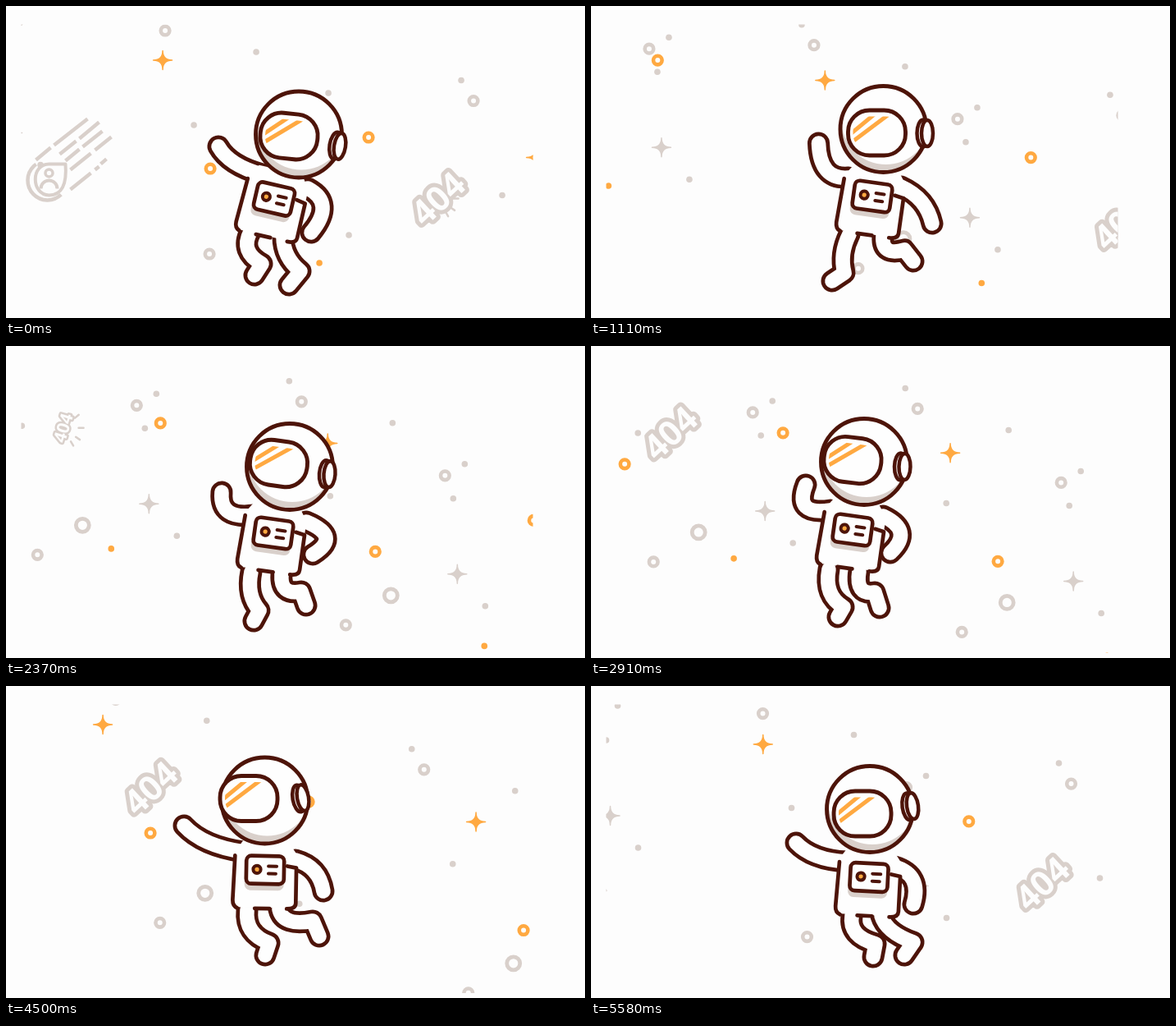
Animation, 706 px wide and 380 px high, one loop 5610 ms. Source, as an HTML page with a canvas:

```html
<!DOCTYPE html>
<html lang="en">
<head>
<meta charset="utf-8">
<title>Astronaut adrift</title>
<style>
html, body { margin: 0; width: 100%; height: 100%; overflow: hidden; background: #fdfdfd; }
canvas { display: block; }
</style>
</head>
<body>
<canvas id="stage" width="706" height="380"></canvas>
<script>
const c = document.getElementById('stage').getContext('2d');
const LOOP = 5610, DRIFT = 5360, TAU = Math.PI * 2, RAD = Math.PI / 180;
const BROWN = '#4d1409', ORANGE = '#ffa941', GREY = '#d9d0cb', WHITE = '#fefefe', BG = '#fdfdfd';

// Two parallax layers: each repeats along its own drift vector.
const layers = [
  { dx: 376, dy: 85.5, color: GREY, items: [
    ['ring', 194, 30], ['ring', 369, 120], ['ring', 248, 302], ['big', 303, 266], ['star', 384, 240],
    ['dot', 179, 5], ['dot', 305, 56], ['dot', 393, 106], ['dot', 379, 148], ['dot', 229, 145], ['dot', 418, 279]] },
  { dx: 455, dy: 118.5, color: ORANGE, items: [
    ['star', 191, 66], ['ring', 442, 160], ['ring', 249, 198], ['dot', 382, 313]] }
];

// Poses of the astronaut, one row per key time.
const times = [0, 1110, 2370, 2910, 3600, 4500, 5580];
const poses = {
  torso: [[327, 235, 13], [343, 232, 8], [326, 228, 8], [319, 224, 8], [315, 222, 2], [316, 224, 1], [339, 233, 3]],
  head: [[357, 156.5], [356.5, 150], [346, 147], [333, 141], [320.5, 138], [315.5, 139.5], [340, 150]],
  visor: [[345, 158.5, 6], [348.5, 154.5, 0], [332.5, 143, 8], [319, 139, 7], [305.5, 137, 1], [296, 137, 0], [331, 155.5, 0]],
  ear: [[405, 170.5, 9], [408, 155, 0], [392.5, 156, 4], [380.5, 147, 1], [367.5, 140, -5], [360, 136.5, -10], [390, 146.5, -8]],
  armL: [
    [312, 205, 272, 194, 259, 171], [314, 209, 279, 212, 277.5, 167], [303, 206, 260, 212, 263, 178],
    [292, 200, 247, 207, 262, 169], [288, 197, 240, 180, 208, 155], [290, 202, 240, 195, 217, 170], [312, 214, 270, 212, 250, 191]],
  armR: [
    [368, 222, 402, 240, 372, 276], [378, 220, 409, 234, 416, 265], [366, 214, 410, 232, 374, 254],
    [356, 207, 394, 225, 365, 252], [350, 208, 384, 218, 394, 252], [353, 212, 382, 220, 387, 250], [370, 220, 404, 230, 393, 266]],
  legL: [
    [298, 275, 285, 299, 312, 314, 303, 328], [315, 278, 303, 302, 309, 325, 294, 335], [299, 275, 293, 304, 309, 322, 302, 335],
    [290, 272, 284, 304, 308, 318, 301, 330], [292, 272, 290, 303, 319, 315, 313, 331], [294, 273, 291, 302, 321, 313, 316, 328],
    [318, 280, 314, 305, 347, 314, 344, 330]],
  legR: [
    [338, 281, 338, 306, 359, 323, 345, 340], [356, 280, 354, 305, 382, 297, 393, 311], [336, 278, 334, 304, 360, 299, 366, 316],
    [327, 274, 322, 304, 346, 300, 352, 319], [331, 270, 338, 293, 373, 287, 381, 306], [333, 272, 338, 293, 374, 286, 382, 305],
    [354, 280, 360, 300, 393, 312, 382, 328]]
};

// Smooth cubic through the key poses.
function pose(rows, t) {
  let i = 0;
  while (i < times.length - 2 && t > times[i + 1]) i++;
  const span = times[i + 1] - times[i], u = (t - times[i]) / span;
  const slope = (j, k) => {
    const a = Math.max(j - 1, 0), b = Math.min(j + 1, times.length - 1);
    return (rows[b][k] - rows[a][k]) / (times[b] - times[a]) * span;
  };
  const e = u * u * (3 - 2 * u), a = u * (1 - u) * (1 - u), b = u * u * (u - 1);
  return rows[i].map((v, k) => v + (rows[i + 1][k] - v) * e + slope(i, k) * a + slope(i + 1, k) * b);
}

function at(x, y, deg, draw) {
  c.save();
  c.translate(x, y);
  c.rotate(deg * RAD);
  draw();
  c.restore();
}

function paint(fill, stroke, width) {
  if (fill) { c.fillStyle = fill; c.fill(); }
  if (stroke) { c.strokeStyle = stroke; c.lineWidth = width; c.stroke(); }
}

function oval(x, y, rx, ry, fill, stroke, width) {
  c.beginPath();
  c.ellipse(x, y, rx, ry, 0, 0, TAU);
  paint(fill, stroke, width);
}

function box(x, y, w, h, r, fill, stroke, width) {
  c.beginPath();
  c.roundRect(x - w / 2, y - h / 2, w, h, r);
  paint(fill, stroke, width);
}

function lines(list, color, width) {
  c.beginPath();
  for (const [x, y, ...rest] of list) {
    c.moveTo(x, y);
    for (let i = 0; i < rest.length; i += 2) c.lineTo(rest[i], rest[i + 1]);
  }
  paint(null, color, width);
}

const shapes = {
  dot: color => oval(0, 0, 3.8, 3.8, color),
  ring: color => oval(0, 0, 5.3, 5.3, BG, color, 4.6),
  big: color => oval(0, 0, 8, 8, BG, color, 4.8),
  star(color) {
    c.beginPath();
    c.moveTo(0, -11.5);
    for (const [x, y] of [[1, 0], [0, 1], [-1, 0], [0, -1]])
      c.quadraticCurveTo((x - y) * -0 + (x + y) * 0 + (x || y) * 0, 0, x * 11.5, y * 11.5);
    paint(color, color, 1.5);
  }
};

function sky(t) {
  for (const { dx, dy, color, items } of layers)
    for (const [kind, x, y] of items)
      for (let k = -2; k < 2; k++) {
        const n = t / DRIFT + k;
        at(x + dx * n, y + dy * n, 0, () => shapes[kind](color));
      }
}

function sign(x, y, age, left) {
  if (age < 0 || left < 0) return;
  const s = Math.min(1, 0.32 + age / 400, left / 150);
  if (age < 400)
    at(x, y, 0, () => lines([-40, 0, 35, 60].map(d => {
      const p = Math.cos(d * RAD), q = Math.sin(d * RAD);
      return [p * 19, q * 19, p * 25, q * 25];
    }), GREY, 2.5));
  at(x, y, -43 - (1 - s) * 60, () => {
    c.scale(s, s);
    c.font = 'bold 42px "Open Sans", sans-serif';
    c.textAlign = 'center';
    c.textBaseline = 'alphabetic';
    c.strokeStyle = GREY;
    c.lineWidth = 10;
    c.strokeText('404', 0, 15);
    c.fillStyle = BG;
    c.fillText('404', 0, 15);
  });
}

function comet(p) {
  at(52 - 0.5 * p, 212 + 0.4 * p, 0, () => {
    c.lineCap = 'butt';
    lines([[-15, -25, 3, -40], [7, -43, 48, -75], [14, -32, 34, -48], [38, -51, 62, -71],
      [21, -24, 38, -38], [42, -41, 66, -60], [27, -13, 52, -33], [57, -37, 77, -53],
      [27, 11, 52, -9], [57, -13, 62, -17], [64, -20, 71, -26]], GREY, 4.5);
    c.beginPath();
    c.arc(-1, 0, 24, 0.8, 4.1);
    paint(null, GREY, 4.5);
    c.beginPath();
    c.moveTo(21, -20);
    c.quadraticCurveTo(24, 18, 1, 18);
    c.bezierCurveTo(-21, 18, -22, -21, 2, -20);
    c.closePath();
    paint(BG, GREY, 4);
    oval(1, -9, 4.5, 4.5, BG, GREY, 3.5);
    c.beginPath();
    c.arc(1, 10, 10, Math.PI, TAU);
    paint(null, GREY, 4);
    c.lineCap = 'round';
  });
}

function limb([x, y, ...p], width) {
  c.beginPath();
  c.moveTo(x, y);
  c.quadraticCurveTo(...p.slice(0, 4));
  if (p.length > 4) c.lineTo(p[4], p[5]);
  paint(null, BROWN, width);
  paint(null, WHITE, width - 9.4);
}

function torso() {
  c.beginPath();
  c.moveTo(-27, -36);
  c.lineTo(27, -36);
  c.lineTo(38, -20);
  c.lineTo(38, 46);
  c.lineTo(-37, 46);
  c.lineTo(-38, -20);
  paint(WHITE);
  c.beginPath();
  c.moveTo(-37, -17);
  c.lineTo(-39, 37);
  c.quadraticCurveTo(-39, 45, -33, 47);
  c.moveTo(-12, 47);
  c.lineTo(6, 47);
  c.moveTo(27, -5);
  c.lineTo(38, -3);
  c.lineTo(38, 40);
  c.quadraticCurveTo(38, 47, 27, 47);
  paint(null, BROWN, 4.7);
  box(-1, 7, 48, 36, 7, GREY);
  box(0, 0, 46, 34, 6, WHITE, BROWN, 4.7);
  oval(-10, -0.5, 4.6, 4.6, ORANGE, BROWN, 4);
  lines([[4, -4.5, 14, -4.5], [4, 4.5, 13, 4.5]], BROWN, 4);
}

function astronaut(t) {
  const now = {};
  for (const part in poses) now[part] = pose(poses[part], t);
  limb(now.armR, 27);
  limb(now.armL, 27);
  limb(now.legL, 27);
  limb(now.legR, 27);
  at(...now.torso, torso);

  at(...now.head, 0, () => {
    c.save();
    oval(0, 0, 52.5, 52.5, GREY);
    c.clip();
    oval(3, -11, 54, 54, WHITE);
    c.restore();
    oval(0, 0, 52.5, 52.5, null, BROWN, 4.9);
  });
  at(...now.visor, () => {
    box(0, 0, 70, 55, 26, WHITE, BROWN, 4.9);
    c.save();
    c.beginPath();
    c.roundRect(-29, -20, 58, 40, 18);
    c.clip();
    c.lineCap = 'butt';
    lines([[-34, 3, 0, -25], [-30, 11, 18, -25]], ORANGE, 5);
    c.restore();
  });
  at(...now.ear, () => {
    oval(-3, 0, 7.5, 16.5, WHITE, BROWN, 4.5);
    oval(2, 0, 7, 16, WHITE, BROWN, 4.5);
  });
}

function draw(t) {
  const p = t > 2700 ? t - DRIFT : t;
  c.fillStyle = BG;
  c.fillRect(0, 0, 706, 380);
  c.lineCap = c.lineJoin = 'round';
  c.save();
  c.beginPath();
  c.rect(18.5, 22.5, 624, 351.5);
  c.clip();
  sky(t);
  sign(96.5 + 0.05 * (t - 2910), 106 + 0.0115 * (t - 2910), t - 2300, 4850 - t);
  sign(526.5 + 0.107 * p, 234.5 + 0.027 * p, p + 330, 2000 - p);
  comet(p);
  c.restore();
  astronaut(t);
}

function frame() {
  draw(performance.now() % LOOP);
  requestAnimationFrame(frame);
}
frame();
</script>
</body>
</html>
```
